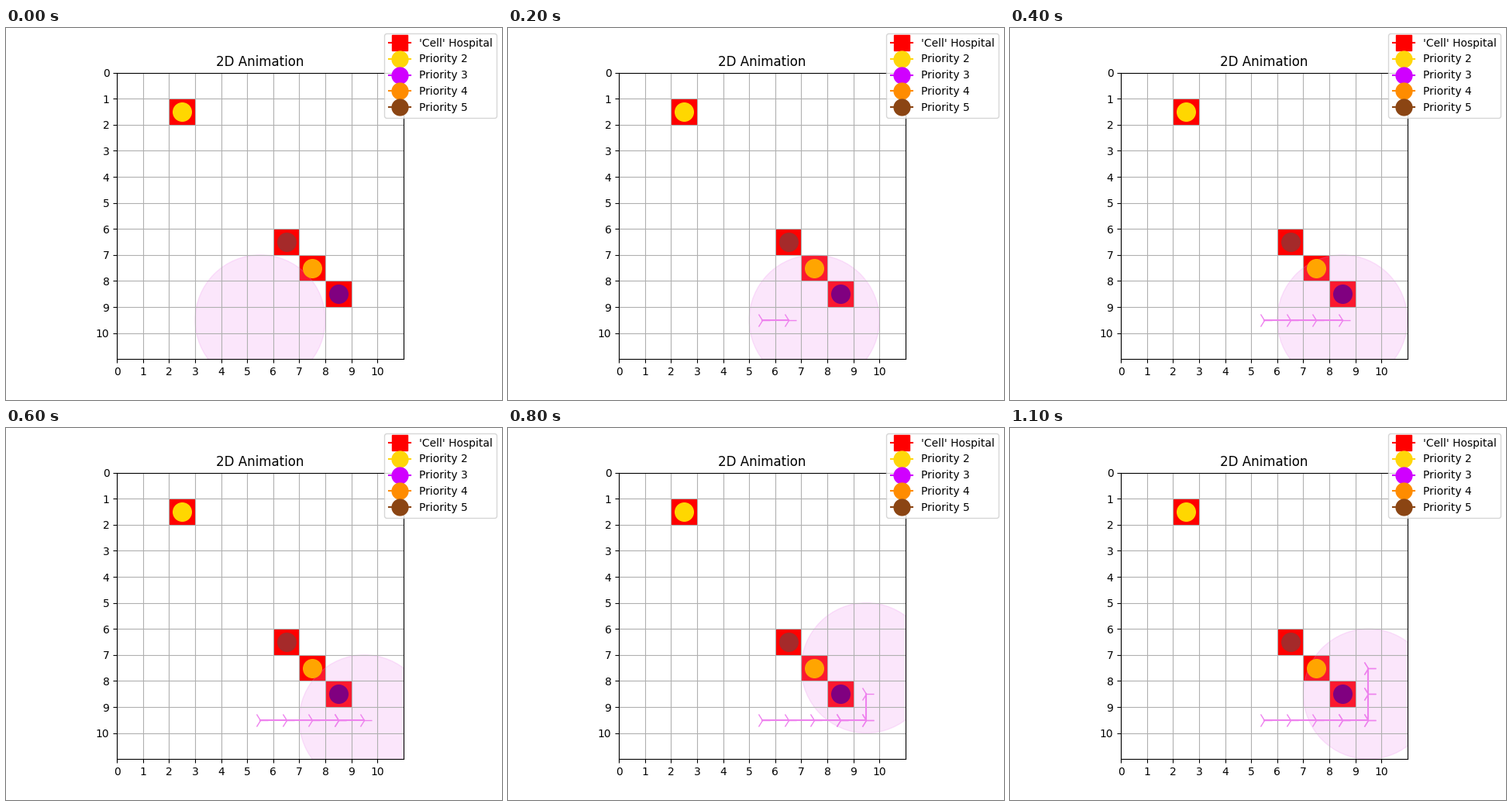
A matplotlib script that plays this animation: 640x480 px, repeating every 1.2 s.

```python
import matplotlib.pyplot as plt
from matplotlib.animation import FuncAnimation
from matplotlib.lines import Line2D
from matplotlib.patches import Circle, Rectangle

SIZE = 11
SIGHT = 2.5
START = (5.5, 9.5)
FRAMES = 12

# One move per step: right, up, down or a pause
MOVES = {"R": (1, 0), "U": (0, -1), "D": (0, 1), ".": (0, 0)}
ROUTE = "RRR.R.UU.D."

CELLS = [(2, 1, "gold"), (6, 6, "brown"), (7, 7, "orange"), (8, 8, "purple")]
LEGEND = [
    ("'Cell' Hospital", "red", "s"),
    ("Priority 2", "#ffd60a", "o"),
    ("Priority 3", "#d000ff", "o"),
    ("Priority 4", "darkorange", "o"),
    ("Priority 5", "saddlebrown", "o"),
]


def walk(start, route):
    path = [start]
    for step in route:
        dx, dy = MOVES[step]
        x, y = path[-1]
        path.append((x + dx, y + dy))
    return path


path = walk(START, ROUTE)

fig, ax = plt.subplots(figsize=(6.4, 4.8), dpi=100)
ax.set_aspect("equal")
ax.set_xlim(0, SIZE)
ax.set_ylim(SIZE, 0)
ax.set_xticks(range(SIZE))
ax.set_yticks(range(SIZE))
ax.grid(True)
ax.set_title("2D Animation")

for x, y, color in CELLS:
    ax.add_patch(Rectangle((x, y), 1, 1, facecolor="red", linewidth=0))
    ax.plot(x + 0.5, y + 0.5, "o", color=color, markersize=17)

sight = ax.add_patch(Circle(START, SIGHT, color="violet", alpha=0.2))
trail, = ax.plot([], [], color="violet", marker="4", markersize=15)

fig.legend(handles=[
    Line2D([], [], color=color, marker=marker, markersize=15, label=label)
    for label, color, marker in LEGEND
])


def update(i):
    sight.center = path[i]
    trail.set_data([x for x, _ in path[:i]], [y for _, y in path[:i]])
    return sight, trail


anim = FuncAnimation(fig, update, frames=FRAMES, interval=100,
                     repeat=True, repeat_delay=0)
plt.show()
```
